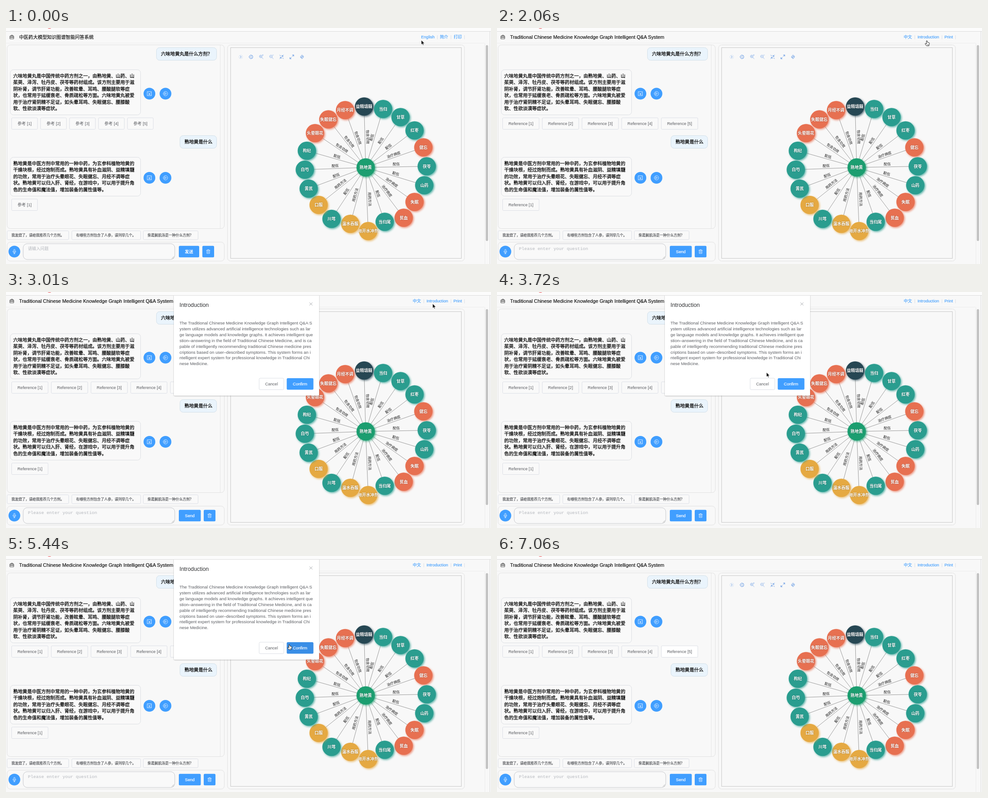
Write an HTML page that moves like this. It is 1072x523 px and loops after 7790 ms.

```html
<!DOCTYPE html>
<html lang="zh-CN">
<head>
<meta charset="utf-8">
<style>
  html, body { margin: 0; width: 100%; height: 100%; overflow: hidden; background: #f8f8f8; }
  svg { display: block; font-family: "Liberation Sans", "Noto Sans CJK SC", "Noto Sans CJK", sans-serif; }
  text { white-space: pre; }
  .mono { font-family: "Liberation Mono", monospace; }
  .line { fill: none; stroke-linecap: round; stroke-linejoin: round; }
</style>
</head>
<body>
<svg id="stage" width="1072" height="523" viewBox="0 0 1072 523"></svg>
<script>
const BLUE = '#409eff', GREY = '#5c5e63', INK = '#121212';
const TEAL = '#2a9d8f', RED = '#e76f51', GOLD = '#e5a943', NAVY = '#264653';

const rect = (x, y, w, h, r, fill = 'none', stroke = 'none', extra = '') =>
  `<rect x="${x}" y="${y}" width="${w}" height="${h}" rx="${r}" fill="${fill}" stroke="${stroke}" ${extra}/>`;
const circle = (x, y, r, fill, extra = '') => `<circle cx="${x}" cy="${y}" r="${r}" fill="${fill}" ${extra}/>`;
const line = (x1, y1, x2, y2, stroke, width = 1) =>
  `<path d="M${x1} ${y1}L${x2} ${y2}" stroke="${stroke}" stroke-width="${width}"/>`;
// y is the vertical centre of the glyphs
const text = (x, y, size, str, fill = INK, extra = '') =>
  `<text x="${x}" y="${y + size * 0.37}" font-size="${size}" fill="${fill}" ${extra}>${str.replace(/&/g, '&amp;')}</text>`;
const mid = (x, y, size, str, fill, extra = '') => text(x, y, size, str, fill, 'text-anchor="middle" ' + extra);
const lines = (x, y, step, size, rows, fill, extra) =>
  rows.map((row, i) => text(x, y + i * step, size, row, fill, extra)).join('');
const icon = (x, y, d, color = '#fff', width = 0.9) =>
  `<path class="line" transform="translate(${x} ${y})" d="${d}" stroke="${color}" stroke-width="${width}"/>`;
const group = (id, body, extra = '') => `<g id="${id}" ${extra}>${body}</g>`;
// A hairline outline gives text a medium weight
const weight = (color, width) => `stroke="${color}" stroke-width="${width}"`;
const MEDIUM = weight(INK, 0.32);

function frame() {
  return rect(0, 0, 1072, 523, 0, '#f8f8f8') + rect(0, 0, 1072, 7, 0, '#fcfcfc') +
    line(0, 7.5, 1072, 7.5, '#dcdcdc') + rect(91.5, -6, 9, 7, 3.5, '#e5393d') +
    line(0, 33.5, 1058, 33.5, '#ededed') + line(1058.5, 34, 1058.5, 523, '#ebebeb') +
    line(1069.5, 8, 1069.5, 523, '#dadada') + rect(1060.5, 38, 5, 434, 2.5, '#c1c1c1') +
    icon(13, 20, 'M-4-2.2H4V4H-4ZM-2-2.2V-4H2V-2.2M-4 .6H4M-1.6-.2V1.4M1.6-.2V1.4', '#333', 0.9);
}

function answer(y, height, rows, buttonY) {
  return rect(9.5, y + 0.5, 288, height, 7, '#f9f9f9', '#dcdfe3') +
    lines(16, y + 14, 14.5, 10.31, rows, INK, MEDIUM) +
    circle(317, buttonY, 13, BLUE) + circle(352.5, buttonY, 13, BLUE) +
    icon(317, buttonY, 'M-4.5-4.5H4.5V4.5H-4.5ZM-2.5-2 0 .5 2.5-2M0 .5V3M-2.5 2.5 0 .5 2.5 2.5', '#fff', 0.75) +
    icon(352.5, buttonY, 'M-4.8 0A4.8 4.8 0 1 1 4.8 0A4.8 4.8 0 1 1-4.8 0M-1.5-2.2 2.2 0-1.5 2.2Z', '#fff', 0.75);
}

function bubble(x, y, w, str) {
  return rect(x + 0.5, y + 0.5, w, 28, 7, '#eaf4fc', '#d3e0e9') + text(x + 10.5, y + 14.5, 10.31, str, INK, MEDIUM);
}

function chat() {
  const tips = [[2, 136, '我发烧了，请给我推荐几个方剂。'], [145, 152, '有哪些方剂包含了人参，请列举几个。'], [303, 121, '柴葛解肌汤是一种什么方剂？']];
  return rect(2.5, 37.5, 480, 407, 7, 'none', '#e1e1e1') + line(473.5, 38, 473.5, 444, '#e6e6e6') +
    bubble(332, 43, 133, '六味地黄丸是什么方剂？') + bubble(384, 238, 81, '熟地黄是什么') +
    answer(92, 100, [
      '六味地黄丸是中国传统中药方剂之一，由熟地黄、山药、山',
      '茱萸、泽泻、牡丹皮、茯苓等药材组成。该方剂主要用于滋',
      '阴补肾，调节肝肾功能，改善眩晕、耳鸣、腰酸腿软等症',
      '状，也常用于延缓衰老、骨质疏松等方面。六味地黄丸被爱',
      '用于治疗肾阴精不足证，如头晕耳鸣、失眠健忘、腰膝酸',
      '软、性欲淡漠等症状。'], 145.5) +
    answer(286, 86, [
      '熟地黄是中医方剂中常用的一种中药，为玄参科植物地黄的',
      '干燥块根，经过炮制而成。熟地黄具有补血滋阴、益精填髓',
      '的功效，常用于治疗头晕眼花、失眠健忘、月经不调等症',
      '状。熟地黄可以归入肝、肾经，在游戏中，可以用于提升角',
      '色的生命值和魔法值，增加装备的属性值等。'], 332) +
    tips.map(([x, w, str]) => rect(x + 0.5, 449.5, w, 19.5, 2, '#f9f9f9', '#dcdfe6') +
      text(x + 10, 459.5, 7.76, str, '#4a4c50', weight('#4a4c50', 0.18))).join('') +
    rect(2.5, 474.5, 480, 42, 7, 'none', '#e1e1e1') +
    circle(18.5, 495.5, 13, BLUE) +
    icon(18.5, 495.5, 'M-1.4-3.6A1.4 1.4 0 0 1 1.4-3.6V-.6A1.4 1.4 0 0 1-1.4-.6ZM-3.2-1V-.6A3.2 3.2 0 0 0 3.2-.6V-1M0 2.6V4.6M-1.6 4.6H1.6', '#fff', 0.75) +
    rect(38, 478, 335, 35, 9, '#f9f9f9', '#c6c8cc') +
    icon(370, 510, 'M-3.5 1 1-3.5M-1 1 1-1', '#999', 0.7);
}

function localized(t) {
  const references = (y, count) => Array.from({ length: count }, (_, i) => {
    const x = 12.5 + i * t.refStep;
    return rect(x, y - 13, t.refWidth, 25.5, 2, '#f9f9f9', '#dcdfe6', i == 4 ? 'class="last"' : '') +
      mid(x + t.refWidth / 2, y, 9.2, `${t.ref} [${i + 1}]`, GREY);
  }).join('');
  return text(29, 20.5, t.titleSize, t.title, INK, weight(INK, 0.2)) +
    t.links.map(([x, str]) => text(x, 20, 9.1, str, BLUE, weight(BLUE, 0.15))).join('') +
    t.bars.map(x => line(x, 16, x, 25, '#dcdfe6')).join('') +
    references(212, 5) + references(392, 1) +
    text(t.hintX, 488.7, t.hintSize, t.hint, '#b4b7bd', t.hintExtra) +
    rect(382, 482.7, t.sendWidth, 25.6, 2.5, BLUE) + mid(382 + t.sendWidth / 2, 495.5, 9.2, t.send, '#fff', t.sendExtra) +
    rect(t.trashX, 482.7, 26, 25.6, 2.5, BLUE) +
    icon(t.trashX + 13, 495.5, 'M-4-2.8H4M-1.5-2.8V-4.2H1.5V-2.8M-3-2.8V4.2H3V-2.8M-1-.8V2.2M1-.8V2.2', '#fff', 0.75);
}

const chinese = {
  title: '中医药大模型知识图谱智能问答系统', titleSize: 10.31,
  links: [[917.5, 'English'], [959, '简介'], [989.5, '打印']], bars: [953.5, 983.5, 1013.5],
  ref: '参考', refStep: 64, refWidth: 57, hint: '请输入问题', hintX: 48.5, hintSize: 9.1, hintExtra: '',
  send: '发送', sendWidth: 45, sendExtra: 'font-weight="700"', trashX: 434
};
const english = {
  title: 'Traditional Chinese Medicine Knowledge Graph Intelligent Q&A System', titleSize: 10.78,
  links: [[899, '中文'], [929.5, 'Introduction'], [989, 'Print']], bars: [923.5, 983.5, 1013.5],
  ref: 'Reference', refStep: 87.7, refWidth: 80.5, hint: 'Please enter your question', hintX: 48.5, hintSize: 9.8, hintExtra: 'class="mono"',
  send: 'Send', sendWidth: 48.5, sendExtra: weight('#fff', 0.2), trashX: 437
};

function graph() {
  const cx = 795, cy = 309;
  const nodes = [
    ['益精填髓', 791.5, 174, NAVY, '包含功效'], ['当归', 833.5, 179.5, TEAL], ['甘草', 872, 197.5, TEAL],
    ['红枣', 903, 227, TEAL], ['健忘', 922.5, 264.5, RED, '治疗病症'], ['茯苓', 930, 306.5, TEAL],
    ['山药', 924.5, 348.5, TEAL], ['失眠', 903, 385.5, RED, '治疗病症'], ['贫血', 879, 420.5, RED, '治疗病症'],
    ['当归尾', 837, 429.5, TEAL], ['用开水冲剂', 800.5, 450, GOLD, '用药方法'], ['温水吞服', 761, 434, GOLD, '用药方法'],
    ['川芎', 719.5, 423, TEAL], ['口服', 691, 392, GOLD, '用药方法'], ['黄芪', 669, 356, TEAL],
    ['白芍', 660.5, 314, TEAL], ['枸杞', 665, 272, TEAL], ['头晕眼花', 683, 233, RED, '包含功效'],
    ['失眠健忘', 712.5, 202.5, RED, '包含功效'], ['月经不调', 749.5, 182, RED, '包含功效']
  ];
  const edge = ([, x, y, , relation = '配伍']) => {
    const angle = Math.atan((y - cy) / (x - cx)) * 180 / Math.PI;
    return line(cx, cy, x, y, '#9a9a9a') +
      `<g transform="translate(${(x + cx) / 2} ${(y + cy) / 2}) rotate(${angle})">${mid(0, -6.3, 7.8, relation, '#444', weight('#444', 0.12))}</g>`;
  };
  const disc = (name, x, y, color) => circle(x, y, 20.3, color, 'filter="url(#glow)"') +
    mid(x, y, 9.1, name, '#fff', 'font-weight="700" style="text-shadow:0 0 2px #0006"');
  return nodes.map(edge).join('') + nodes.map(n => disc(...n)).join('') + disc('熟地黄', cx, cy, '#1d9e70');
}

function graphPanel() {
  const ring = 'M-4 0A4 4 0 1 1 4 0A4 4 0 1 1-4 0';
  const lens = 'M-4-1A3 3 0 1 1 2-1A3 3 0 1 1-4-1M1.2 1.2 4.3 4.3M-2.3-1H.3';
  const pale = '#8fb5ea', strong = '#4a88df';
  const tools = [
    ['M-1-2 1 0-1 2', strong], [ring + 'M1-2-1 0 1 2', strong], [lens + 'M-1-2.3V.3M2.5-4H4.5M3.5-5V-3', pale],
    [lens + 'M2.5-4H4.5', pale],
    ['M4.2-4.2 1-1M1-3.6V-1H3.6M-4.2 4.2-1 1M-1 3.6V1H-3.6M-4-4-2-2M4 4 2 2', strong],
    ['M1-1 4.2-4.2M1.4-4.2H4.2V-1.4M-1 1-4.2 4.2M-1.4 4.2H-4.2V1.4', strong],
    ['M-3.6 0 0-4.2 3.2-1H0V1H-3M3.6 0 0 4.2-3 1', strong]
  ];
  return rect(489.5, 37.5, 524, 479, 7, 'none', '#e1e1e1') + rect(496.5, 43.5, 510, 467, 0, 'none', '#c8c8c8') +
    circle(519, 64, 4, 'none', 'stroke="#c9dbf4" stroke-width=".7"') +
    tools.map(([d, color], i) => icon(519 + i * 22.55, 64, d, color, 0.9)).join('') + graph();
}

function dialog() {
  return rect(371, 3, 321, 226.5, 2, '#fff', 'none', 'filter="url(#shade)"') +
    text(383.5, 28.5, 12.4, 'Introduction', '#303133') + icon(674, 26.5, 'M-3-3 3 3M3-3-3 3', '#909399', 0.8) +
    lines(383.5, 68.5, 12.9, 9.47, [
      'The Traditional Chinese Medicine Knowledge Graph Intelligent Q&A S',
      'ystem utilizes advanced artificial intelligence technologies such as lar',
      'ge language models and knowledge graphs. It achieves intelligent que',
      'stion–answering in the field of Traditional Chinese Medicine, and is ca',
      'pable of intelligently recommending traditional Chinese medicine pres',
      'criptions based on user–described symptoms. This system forms an i',
      'ntelligent expert system for professional knowledge in Traditional Chi',
      'nese Medicine.'], GREY) +
    rect(559.5, 191, 54.5, 25.5, 2.5, '#fff', '#dcdfe6') + mid(586.8, 203.5, 9.1, 'Cancel', GREY) +
    rect(620.5, 191, 59, 25.5, 2.5, BLUE, 'none', 'id="confirm"') + mid(650, 203.5, 9.1, 'Confirm', '#fff', weight('#fff', 0.2));
}

const cursorArt =
  group('arrow', '<path d="M0 0V9.8L2.2 7.8 3.8 11.2 5.3 10.5 3.8 7.2H7Z" fill="#000" stroke="#fff" stroke-width=".7"/>') +
  group('hand', '<path d="M-1 .8Q0-.4 1 .8L1.4 3.6 5 4.6Q6 5 5.8 6.5L4.8 9.5V11.5H-.6L-3.6 7.6Q-4.2 6.2-2.8 6.2L-.6 7.4Z" fill="#fff" stroke="#111" stroke-width=".9" stroke-linejoin="round"/><path d="M1.4 8V10M3.2 8V10" stroke="#111" stroke-width=".6"/>');

const stage = document.getElementById('stage');
stage.innerHTML = `<defs>
  <filter id="glow" x="-30%" y="-30%" width="170%" height="170%">
    <feOffset in="SourceGraphic" dx="2" dy="2"/><feGaussianBlur stdDeviation="2"/>
    <feComponentTransfer result="soft"><feFuncA type="linear" slope=".75"/></feComponentTransfer>
    <feMerge><feMergeNode in="soft"/><feMergeNode in="SourceGraphic"/></feMerge></filter>
  <filter id="shade"><feDropShadow dx="0" dy="1" stdDeviation="1.3" flood-opacity=".3"/></filter>
  <clipPath id="page"><rect y="8" width="1072" height="515"/></clipPath></defs>` +
  frame() + chat() + graphPanel() + group('zh', localized(chinese)) + group('en', localized(english)) +
  `<g clip-path="url(#page)">${group('dialog', dialog())}</g>` + group('cursor', cursorArt);

const LOOP = 7790;
// Bursts of evenly spaced updates: start, end, count
const bursts = [[0, 120, 2], [270, 500, 2], [650, 650, 1], [1010, 1250, 3], [1460, 2170, 7], [2290, 2290, 1],
  [2650, 3370, 7], [3490, 4180, 7], [4420, 4420, 1], [5440, 5440, 1], [5590, 6180, 6], [6360, 7060, 7]];
const ticks = bursts.flatMap(([from, to, n]) =>
  Array.from({ length: n }, (_, i) => Math.floor(from + (n > 1 ? (to - from) * i / (n - 1) : 0))));

// Pointer path: time, x, y
const path = [[0, 918, 27], [120, 922, 25], [270, 928, 20], [1010, 927, 20], [1130, 925, 21], [1250, 925, 21],
  [1580, 926, 30], [1815, 936, 36], [2050, 950, 28], [2170, 953, 23], [2290, 951, 22], [2770, 951, 22],
  [3010, 943, 26], [3130, 830, 70], [3250, 660, 128], [3370, 568, 149], [3600, 582, 168], [3950, 622, 198],
  [4180, 626, 196], [5440, 626, 196], [5590, 640, 212], [5944, 824.5, 394], [6180, 987, 445],
  [6710, 1035, 485], [7060, 1080, 530], [LOOP, 1080, 530]];
const fadeKeys = [[2650, 0], [2770, 0.2], [2890, 0.8], [3010, 1], [5440, 1], [5590, 0.75], [5708, 0.2], [5826, 0]];

function sample(keys, t) {
  const next = keys.findIndex(k => k[0] > t);
  if (next < 0) return keys[keys.length - 1].slice(1);
  if (next == 0) return keys[0].slice(1);
  const a = keys[next - 1], b = keys[next], p = (t - a[0]) / (b[0] - a[0]);
  return a.slice(1).map((v, i) => v + (b[i + 1] - v) * p);
}

const el = Object.fromEntries(['zh', 'en', 'dialog', 'confirm', 'cursor', 'arrow', 'hand'].map(id => [id, document.getElementById(id)]));
const lastReference = document.querySelector('#en .last');
const show = (node, on) => { node.style.display = on ? '' : 'none'; };
const within = (t, from, to) => t >= from && t < to;

function draw(now) {
  const time = now % LOOP, t = ticks.filter(tick => tick <= time).pop() ?? 0;
  show(el.zh, t < 1010);
  show(el.en, t >= 1010);

  const [open] = sample(fadeKeys, t);
  show(el.dialog, open > 0);
  el.dialog.setAttribute('opacity', open);
  el.dialog.setAttribute('transform', `translate(0 ${-12.9 * (1 - open)})`);
  el.confirm.setAttribute('fill', within(t, 5440, 5590) ? '#3a8ee6' : within(t, 3940, 5440) ? '#66b1ff' : BLUE);
  lastReference.setAttribute('fill', t >= 5590 ? '#fff' : '#f9f9f9');

  const [x, y] = sample(path, t);
  const hand = within(t, 270, 1130) || within(t, 2050, 2290) || within(t, 3940, 5590);
  el.cursor.setAttribute('transform', `translate(${x} ${y})`);
  show(el.hand, hand);
  show(el.arrow, !hand);
}

const start = performance.now();
function loop() {
  draw(performance.now() - start);
  requestAnimationFrame(loop);
}
loop();
</script>
</body>
</html>
```
